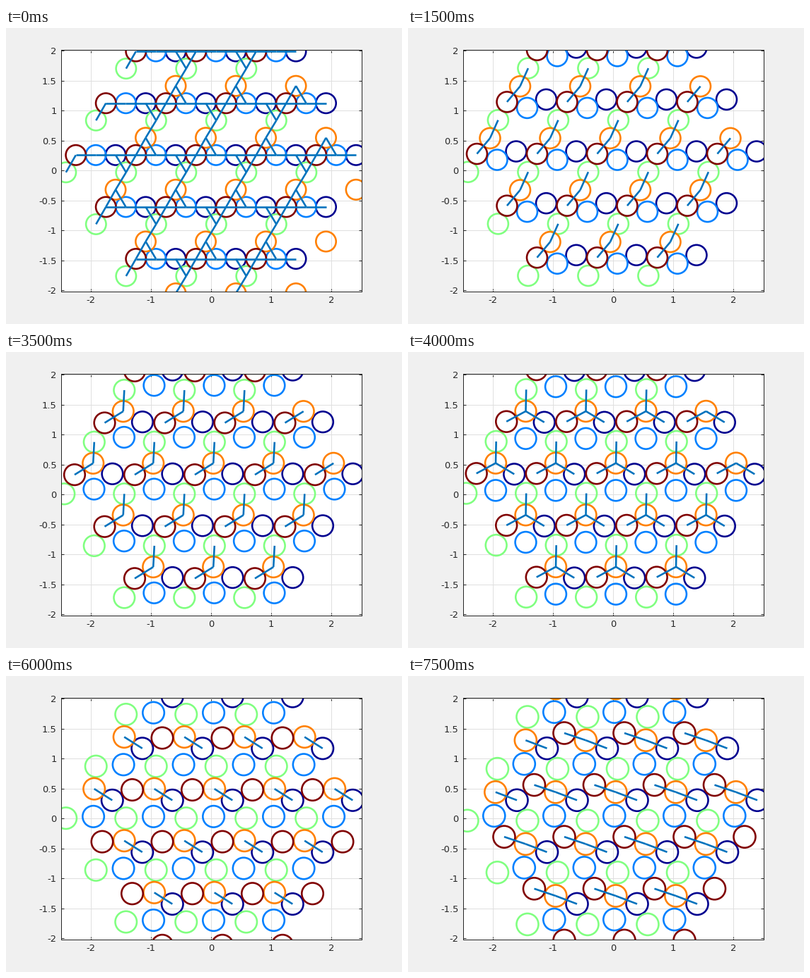
A matplotlib script for the animation above (8000 ms loop, 560 by 420 pixels).

```python
import numpy as np
import matplotlib.pyplot as plt
from matplotlib.animation import FuncAnimation
from matplotlib.collections import LineCollection

W, H, DPI = 560, 420, 100
FRAMES, INTERVAL = 16, 500
PX = 72 / DPI  # points per pixel

COLORS = ["#00008f", "#0080ff", "#80ff80", "#ff8000", "#800000"]
NAVY, BLUE, GREEN, ORANGE, RED = range(5)

# Path of each disc in the central cell, through a few knots in time
KNOTS = np.array([0, 3, 5, 8, 10, 12, 15])
PATHS = {
    NAVY: ([.412, .388, .365, .356, .347, .356, .400],
           [.258, .320, .344, .340, .314, .305, .306]),
    BLUE: ([.082, .071, .065, .047, .042, .042, .021],
           [.258, .179, .140, .069, .044, .034, .046]),
    GREEN: ([-.414, -.413, -.424, -.445, -.415, -.415, -.424],
            [-.030, -.024, -.012, .020, .026, .006, -.035]),
    ORANGE: ([-.088, -.047, .004, .047, .049, .055, .045],
             [.547, .540, .520, .525, .522, .496, .441]),
    RED: ([-.250, -.265, -.271, -.274, -.294, -.312, -.312],
          [.258, .279, .300, .352, .409, .479, .561]),
}

# Hexagonal patch of 19 cells
ROW = np.sqrt(3) / 2
CELLS = np.array([(a + b / 2, b * ROW)
                  for b in range(-2, 3) for a in range(-2, 3)
                  if abs(a + b) <= 2])
WRAP = np.array([.5, -ROW])


def hermite(values, t):
    v = np.array(values)
    m = np.gradient(v, KNOTS)
    i = min(np.searchsorted(KNOTS, t, side="right") - 1, len(KNOTS) - 2)
    h = KNOTS[i + 1] - KNOTS[i]
    s = (t - KNOTS[i]) / h
    return ((1 + 2 * s) * (1 - s) ** 2 * v[i] + s * (1 - s) ** 2 * h * m[i]
            + s * s * (3 - 2 * s) * v[i + 1] + s * s * (s - 1) * h * m[i + 1])


def positions(kind, k):
    p = np.array([hermite(c, k) for c in PATHS[kind]])
    if (kind == ORANGE and k < 3) or (kind == RED and k >= 10):
        p = p + WRAP
    return CELLS + p


def contacts(k):
    """Pairs of kinds in contact, and the reach of a bond."""
    if k == 0:
        return [(a, b) for a in range(5) for b in range(a + 1, 5)], .35
    if k < 8:
        return [(RED, ORANGE), (ORANGE, GREEN)], .42
    if k == 8:
        return [(RED, ORANGE), (ORANGE, GREEN), (ORANGE, NAVY)], .42
    if k < 14:
        return [(ORANGE, NAVY)], .42
    return [(ORANGE, NAVY), (RED, ORANGE)], .42


def bonds(discs, k):
    pairs, reach = contacts(k)
    segs = []
    for a, b in pairs:
        gap = discs[a][:, None] - discs[b][None]
        near = np.argwhere(np.hypot(gap[..., 0], gap[..., 1]) < reach)
        segs += [(discs[a][i], discs[b][j]) for i, j in near]
    return segs


fig = plt.figure(figsize=(W / DPI, H / DPI), dpi=DPI, facecolor="#f0f0f0")
left, right, top, bottom = 77.5, 502.5, 31, 373.5
ax = fig.add_axes([left / W, 1 - bottom / H,
                   (right - left) / W, (bottom - top) / H])
ax.set(xlim=(-2.5, 2.5), ylim=(-2.015, 2.015))
xt, yt = np.arange(-2, 3), np.arange(-2, 2.5, .5)
ax.set_xticks(xt, [f"{v:g}" for v in xt])
ax.set_yticks(yt, [f"{v:g}" for v in yt])
INK = "#262626"
ax.tick_params(direction="in", top=True, right=True, length=4 * PX,
               width=PX, color=INK, labelcolor=INK, labelsize=13 * PX,
               labelfontfamily="DejaVu Sans")
ax.tick_params(axis="x", pad=7 * PX)
ax.tick_params(axis="y", pad=6 * PX)
ax.grid(color="#dfdfdf", linewidth=PX)
ax.set_axisbelow(True)
for spine in ax.spines.values():
    spine.set(color=INK, linewidth=PX)

LINE = 2.6 * PX
rings = [ax.scatter([], [], facecolors="none", edgecolors=c,
                    linewidths=LINE, zorder=2) for c in COLORS]
links = LineCollection([], colors="#0072bd", linewidths=LINE,
                       capstyle="butt", zorder=2.3)
ax.add_collection(links, autolim=False)


def draw(k):
    discs = [positions(kind, k) for kind in range(5)]
    radius = 14.2 + 1.3 * k / (FRAMES - 1)
    for ring, p in zip(rings, discs):
        ring.set_offsets(p)
        ring.set_sizes([(2 * radius * PX) ** 2])
    links.set_segments(bonds(discs, k))
    return [*rings, links]


anim = FuncAnimation(fig, draw, frames=FRAMES, interval=INTERVAL,
                     repeat=True, repeat_delay=0)
plt.show()
```
